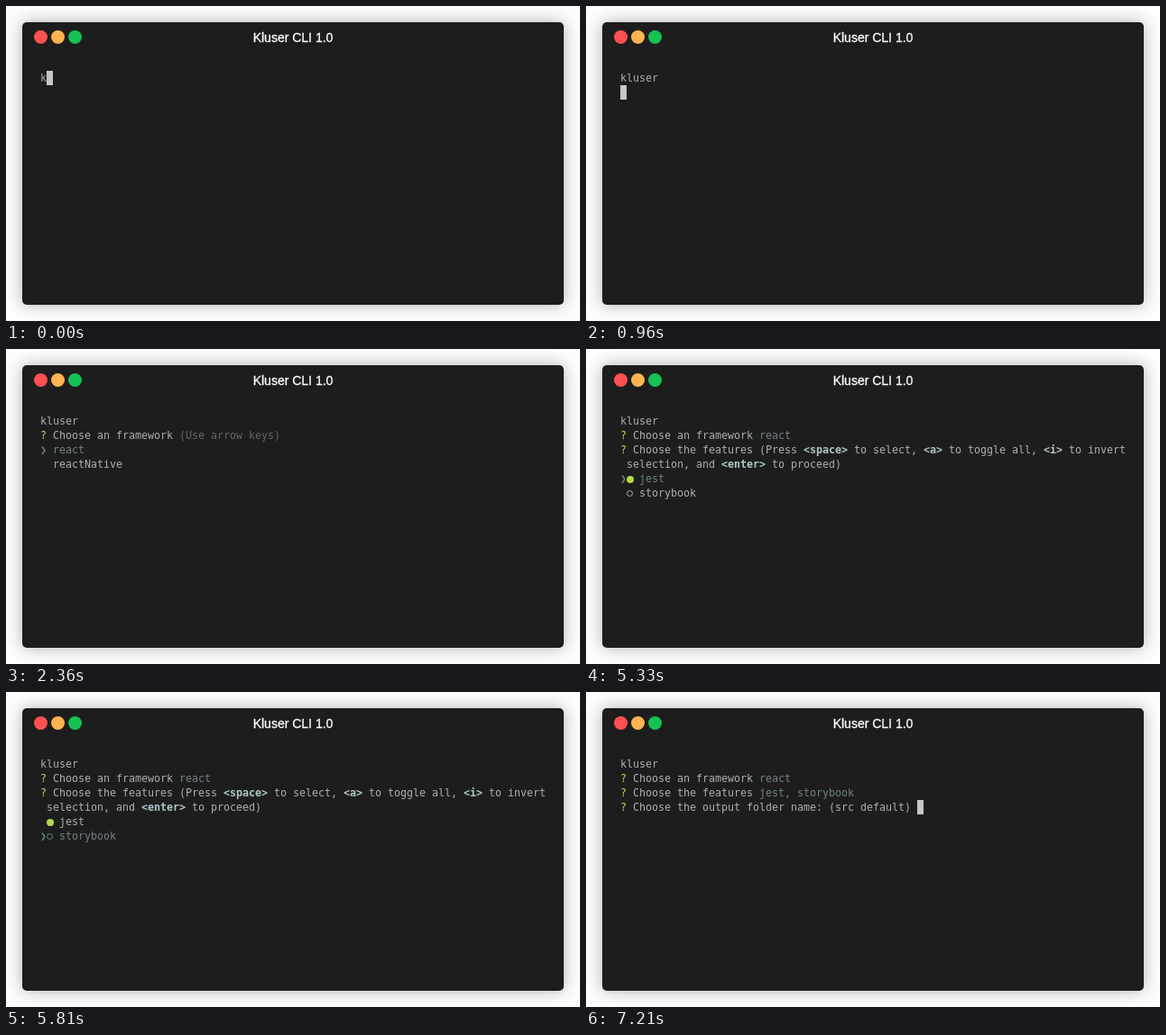
Recreate the animation shown at these times as an HTML page. Size 636 by 350 pixels, loop 8000 ms.

```html
<!DOCTYPE html>
<html lang="en">
<head>
<meta charset="utf-8">
<title>Kluser CLI 1.0</title>
<style>
  :root { --loop: 8s step-end infinite; --cyan: #708387; --green: #b3d84a; }
  html, body { margin: 0; width: 100%; height: 100%; overflow: hidden; background: #fdfdfd; }
  .window {
    position: absolute; left: 18px; top: 18px; width: 600px; height: 314px;
    border-radius: 5px; background: #1d1d1d; overflow: hidden;
  }
  .shadow {
    position: absolute; left: 18px; top: 18px; width: 600px; height: 314px;
    border-radius: 5px; box-shadow: 0 0 18px rgba(0, 0, 0, .3);
  }
  .light { position: absolute; top: 9px; width: 15px; height: 15px; border-radius: 50%; }
  .title {
    position: absolute; left: 0; top: 9px; width: 100%; text-align: center;
    font: 14px/16px "Liberation Sans", Arial, sans-serif; color: #fff;
    -webkit-text-stroke: .3px #fff;
  }
  .term {
    position: absolute; left: 20px; top: 54px; width: 580px; height: 256px; overflow: hidden;
    font: 11.63px/16px "DejaVu Sans Mono", monospace; color: #afafaf; white-space: pre;
  }
  .line { height: 16px; }
  .typed, .cursor, .ptr, .off, .on {
    display: inline-block; position: relative; height: 16px; width: 7px; vertical-align: top;
  }
  .typed { overflow: hidden; animation: type var(--loop); }
  .cursor { background: #c7c7c7; }
  .line .cursor { animation: leave var(--loop); }

  /* One screen per step, shown through a fixed slot */
  .slot { height: 240px; overflow: hidden; }
  .reel { animation: reel var(--loop); }
  pre { margin: 0; height: 240px; font: inherit; --q: #d6c873; }
  pre.late { --q: #c3d65a; }
  u { text-decoration: none; color: var(--q); }
  i { font-style: normal; color: var(--cyan); }
  b { color: #b1c6ca; }
  .hint { color: #666; }
  .ptr { color: var(--cyan); }
  .off::before, .on::before { content: ""; position: absolute; border-radius: 50%; box-sizing: border-box; }
  .off::before { left: 0; top: 5px; width: 7px; height: 7px; border: 1px solid currentColor; }
  .on::before { left: -.5px; top: 4.5px; width: 8px; height: 8px; background: var(--green); }

  @keyframes type {
    0% { width: 7px; }
    2.25% { width: 14px; }
    6.375% { width: 21px; }
    7.3125% { width: 28px; }
    8.25% { width: 35px; }
    10.125%, 100% { width: 42px; }
  }
  @keyframes leave {
    0% { opacity: 1; }
    12%, 100% { opacity: 0; }
  }
  @keyframes reel {
    0% { transform: translateY(0); }
    12% { transform: translateY(-240px); }
    29.5% { transform: translateY(-480px); }
    49.375% { transform: translateY(-720px); }
    66.625% { transform: translateY(-960px); }
    72.625% { transform: translateY(-1200px); }
    79.75% { transform: translateY(-1440px); }
    90.125%, 100% { transform: translateY(-1680px); }
  }
</style>
</head>
<body>
<div class="shadow"></div>
<div class="window">
  <div class="light" style="left:13px;background:#ff5150"></div>
  <div class="light" style="left:32px;background:#ffb44f"></div>
  <div class="light" style="left:51px;background:#15c253"></div>
  <div class="title">Kluser CLI 1.0</div>
  <div class="term"><div class="line"><span class="typed">kluser</span><span class="cursor"></span></div><div class="slot"><div class="reel"><pre></pre><pre><span class="cursor"></span></pre><pre>
<u>?</u> Choose an framework <span class="hint">(Use arrow keys)</span>
<span class="ptr">❯</span> <i>react</i>
  reactNative</pre><pre>
<u>?</u> Choose an framework <i>react</i>
<u>?</u> Choose the features (Press <b>&lt;space&gt;</b> to select, <b>&lt;a&gt;</b> to toggle all, <b>&lt;i&gt;</b> to invert
 selection, and <b>&lt;enter&gt;</b> to proceed)
<span class="ptr">❯</span><i><span class="off"></span> jest</i>
 <span class="off"></span> storybook</pre><pre class="late">
<u>?</u> Choose an framework <i>react</i>
<u>?</u> Choose the features (Press <b>&lt;space&gt;</b> to select, <b>&lt;a&gt;</b> to toggle all, <b>&lt;i&gt;</b> to invert
 selection, and <b>&lt;enter&gt;</b> to proceed)
<span class="ptr">❯</span><i><span class="on"></span> jest</i>
 <span class="off"></span> storybook</pre><pre class="late">
<u>?</u> Choose an framework <i>react</i>
<u>?</u> Choose the features (Press <b>&lt;space&gt;</b> to select, <b>&lt;a&gt;</b> to toggle all, <b>&lt;i&gt;</b> to invert
 selection, and <b>&lt;enter&gt;</b> to proceed)
 <span class="on"></span> jest
<span class="ptr">❯</span><i><span class="off"></span> storybook</i></pre><pre class="late">
<u>?</u> Choose an framework <i>react</i>
<u>?</u> Choose the features (Press <b>&lt;space&gt;</b> to select, <b>&lt;a&gt;</b> to toggle all, <b>&lt;i&gt;</b> to invert
 selection, and <b>&lt;enter&gt;</b> to proceed)
 <span class="on"></span> jest
<span class="ptr">❯</span><i><span class="on"></span> storybook</i></pre><pre class="late">
<u>?</u> Choose an framework <i>react</i>
<u>?</u> Choose the features <i>jest, storybook</i>
<u>?</u> Choose the output folder name: (src default) <span class="cursor"></span></pre></div></div></div>
</div>
</body>
</html>
```
